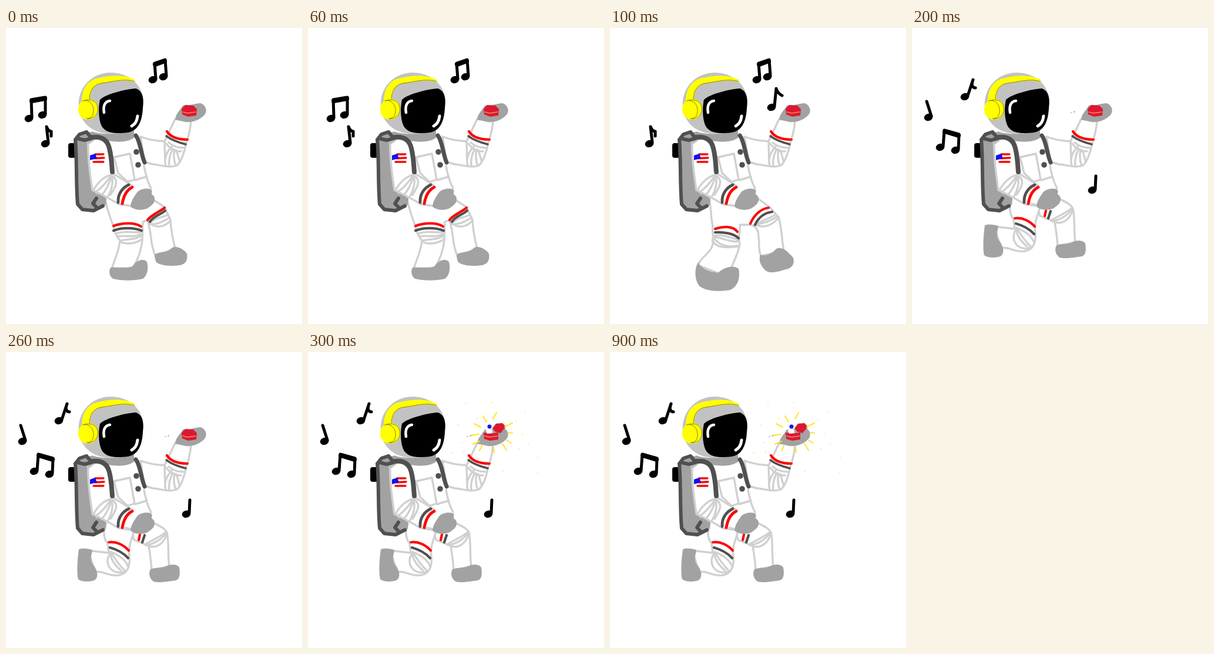
An HTML page for the animation above (1300 ms loop, 504x504 px).

```html
<!DOCTYPE html>
<html lang="en">
<head>
<meta charset="utf-8">
<title>Dancing astronaut</title>
<style>
  html, body { margin: 0; width: 100%; height: 100%; overflow: hidden; background: #fff; }
  svg { display: block; width: 100vw; height: 100vh; }
  path, line { fill: none; stroke-linecap: round; stroke-linejoin: round; }
  .suit { fill: #fff; stroke: #d0d0d0; stroke-width: 3.4; }
  .fold { stroke: #d0d0d0; stroke-width: 3.4; }
  .red { stroke: #fb0505; stroke-width: 4.2; }
  .dark { stroke: #505050; stroke-width: 4.2; }
  .strap { stroke: #505050; stroke-width: 6; }
  .grey { fill: #a2a2a2; }
  .ink { stroke: #000; stroke-width: 5; }
  .ray { stroke: #ffe51e; stroke-width: 2; }
  .trim { stroke: #8a8200; stroke-width: 1; }
</style>
</head>
<body>
<svg viewBox="0 0 504 504">
  <!-- legs -->
  <g data-show="0">
    <path class="suit" d="M168 288C171 306 178 324 183 338C185 347 187 353 194 362C193 378 185 394 180 410L217 408C223 395 230 382 232 362L233 330L241 327C244 338 246 348 247 358C248 370 251 380 255 390L288 375C284 360 281 344 280 327L270 305L250 292Z"/>
    <path class="fold" d="M188 350C201 344 217 350 230 347M190 355C204 352 215 358 229 351M194 362C208 359 219 361 230 354M194 364C208 370 222 366 231 360M244 333C257 321 266 323 276 318M246 334C259 335 269 328 279 323M246 333C257 342 271 338 280 328"/>
    <path class="red" d="M183 337C197 332 218 330 230 338M241 327C247 318 259 315 270 306"/>
    <path class="dark" d="M183 345C198 339 218 340 231 345M245 330C251 320 262 319 271 311"/>
    <path class="grey" d="M178 408C190 406 206 411 215 406C220 398 232 390 240 398C243 410 241 421 233 427C215 431 195 430 182 427C175 421 175 413 178 408ZM254 385C263 380 275 383 283 374C291 370 303 377 308 384C310 395 306 402 296 404C281 406 265 405 256 399Q252 391 254 385Z"/>
  </g>
  <g data-show="1">
    <path class="suit" d="M168 288C173 306 171 322 175 337C173 350 179 360 173 374C166 387 153 392 150 404L186 418L207 407C212 394 219 383 221 367C217 355 223 347 221 335L240 335C250 338 253 346 253 356C255 370 252 378 257 388L296 380C292 360 293 340 287 322L272 305L250 289Z"/>
    <path class="fold" d="M177 354C188 350 206 357 219 361M178 356C193 357 207 366 219 363M177 358C188 372 202 373 217 371M174 361C180 376 200 374 219 372M248 335C259 326 272 326 282 317M248 335C262 332 277 328 285 320M248 335C264 343 279 333 287 323"/>
    <path class="red" d="M179 342C190 338 209 336 217 347M239 333C245 319 256 308 270 306"/>
    <path class="dark" d="M179 348C194 347 211 350 219 358M247 335C253 322 262 315 276 313"/>
    <path class="grey" d="M150 399C155 410 170 415 184 417C194 407 211 403 219 410C222 425 218 440 205 446C187 449 165 449 153 440C143 429 144 408 150 399ZM256 386C265 390 276 384 283 376C293 370 304 382 312 391C315 401 310 410 299 411C286 415 271 420 263 411C255 403 253 393 256 386Z"/>
  </g>
  <g data-show="2 3">
    <path class="suit" d="M240 284C253 294 269 297 274 307C278 326 275 344 278 365L248 371C247 355 245 343 243 330L218 320L214 304Z"/>
    <path class="suit" d="M172 284C166 301 164 315 173 326L175 342L140 338L152 375C163 371 177 383 192 380C206 378 212 365 210 348C207 331 215 319 218 304Z"/>
    <path class="fold" d="M177 344C171 352 172 362 178 369C183 375 193 377 204 374M177 342C179 354 187 365 196 372M178 340C185 352 193 363 202 372M180 341C194 347 204 355 208 365M238 329C252 327 266 319 273 307M238 327C249 320 263 315 273 306M241 329C252 336 267 329 273 312"/>
    <path class="red" d="M175 324C188 322 201 329 209 338M228 311L226 320"/>
    <path class="dark" d="M177 333C188 336 200 342 208 351M236 312L232 324"/>
    <path class="grey" d="M124 336C131 333 140 335 147 337C146 346 142 353 148 362C157 372 158 385 150 389C140 392 128 391 123 387C120 375 122 350 124 336ZM246 370C257 366 267 369 274 364C281 361 292 361 295 367C297 378 296 388 288 389C274 391 256 394 250 390C243 384 243 375 246 370Z"/>
  </g>

  <!-- backpack -->
  <rect x="106" y="196" width="13" height="25" rx="4"/>
  <path class="grey" d="M117 189L126 180L145 177L180 201L170 301L155 311L130 310L121 301Z"/>
  <path fill="#c0c0c0" style="fill:#c0c0c0" d="M137 194L150 189L165 205L155 285L146 273Z"/>
  <path class="strap" d="M118 190C121 225 119 270 122 300L130 309L149 311L165 303M118 190L125 181L137 177L146 188L134 191L121 188M154 290L148 299L155 306"/>

  <!-- torso and arms -->
  <path style="fill:#fff" d="M140 199L155 188L219 186L231 195L239 240L250 278L225 302L172 291L146 273Z"/>
  <path class="fold" d="M235 235C238 249 240 260 247 273"/>
  <path class="suit" d="M229 185C241 190 255 192 270 193L288 155L315 158C314 173 311 184 307 195C304 212 298 228 291 234C278 239 263 233 250 232L236 228Z"/>
  <path class="fold" d="M270 193L271 231M273 197C280 206 287 211 298 210M277 195C286 203 294 204 302 204M282 202C272 213 269 224 272 234M284 206C278 217 277 227 278 235M287 207C285 218 286 227 289 234M290 208L296 228"/>
  <path class="red" d="M274 176C281 187 295 190 309 190"/>
  <path class="dark" style="stroke-width:3.5" d="M273 184C281 190 294 195 306 198"/>
  <path class="fold" d="M140 199C139 226 144 253 147 276C160 282 176 290 192 300L214 303M181 247C193 255 203 260 214 268M179 250C167 253 156 263 149 276M179 251C171 263 162 273 153 279M180 252C176 264 171 276 164 283M180 252C183 263 180 276 174 286M182 252C191 260 189 267 178 284"/>
  <path class="fold" d="M184 220L211 214L219 258L207 262L191 247ZM220 259L240 253"/>
  <circle cx="222" cy="211" r="4.8" fill="#505050"/>
  <circle cx="225" cy="233" r="4.8" fill="#505050"/>
  <path class="dark" style="stroke-width:4.8" d="M209 267C198 272 190 283 191 297"/>
  <path class="red" style="stroke-width:4.8" d="M215 271C205 276 200 287 198 299"/>
  <path class="grey" d="M223 280C228 274 240 272 247 275C251 278 246 281 249 284C256 288 254 299 245 304C237 312 219 311 212 304C213 294 217 289 223 280Z"/>
  <path class="grey" d="M288 156C289 145 297 140 301 132C313 133 323 128 331 128C341 131 344 143 337 149C328 158 316 161 306 160Z"/>

  <!-- shoulder patch -->
  <path class="red" style="stroke-width:3.3" d="M152 215L166 215M151 222L167 221M149 228L166 228"/>
  <path d="M143 217L152 214L155 222L143 225Z" style="fill:#1010ee"/>

  <!-- collar, straps, helmet -->
  <path class="grey" d="M146 176C165 183 195 181 218 173L218 187C203 197 183 193 172 192C161 190 153 187 146 181Z"/>
  <path class="strap" style="stroke-width:8" d="M147 186C164 184 173 191 176 205C180 221 180 234 181 245"/>
  <path class="strap" style="stroke-width:7" d="M221 183C229 193 229 212 236 229"/>
  <path style="fill:#c2c2c2" d="M124 135C121 103 145 76 178 76C211 76 235 99 234 128C233 156 215 180 178 180C145 180 126 159 124 135Z"/>
  <path style="fill:#000" d="M160 122C171 112 204 104 221 103C233 107 235 120 233 136C232 157 226 175 207 178C189 180 173 180 165 170C157 160 157 135 160 122Z"/>
  <path d="M167 144C165 133 168 125 177 124" stroke="#fff" stroke-width="4.5"/>
  <path d="M224 150C223 159 220 164 214 167" stroke="#fff" stroke-width="5"/>

  <!-- headphones -->
  <path style="fill:#ffff00" d="M129 126C129 101 141 88 158 85C180 80 201 79 219 88L219 92C199 86 181 93 163 94C147 97 143 109 143 126Z"/>
  <path class="trim" d="M142 123C142 106 149 96 163 94C181 92 200 85 219 91"/>
  <path style="fill:#ffff00" d="M131 123C140 119 152 121 156 131C159 145 152 156 141 156C129 157 122 147 123 136Q124 128 131 123Z"/>
  <path class="trim" d="M131 124C143 121 150 132 149 143C148 151 143 155 137 154M131 124C142 120 154 123 156 134C158 147 151 154 139 155"/>

  <!-- box -->
  <g data-show="0 1 2">
    <path style="fill:#dc1830" d="M299 138L305 131L319 132L325 138L324 149L310 151L300 147Z"/>
    <path d="M301 143L309 145L323 143" stroke="#f08a62" stroke-width="1.6"/>
  </g>
  <g data-show="3">
    <path style="fill:#dc1830" d="M299 137L310 139L324 137L324 149L310 151L300 148Z"/>
    <path style="fill:#fff" d="M303 134L305 129L314 133L314 138L305 139Z"/>
    <path d="M301 143L309 145L323 143" stroke="#f08a62" stroke-width="1.6"/>
    <path style="fill:#dc1830" d="M314 130L320 122L331 121L337 127L328 138L319 136Z"/>
    <circle cx="309" cy="127" r="3.5" fill="#1818ee"/>
    <g id="rays"></g>
  </g>
  <path data-show="2 3" d="M271 144h.3M276 143l1-.5" stroke="#222" stroke-width="1"/>
  <g id="notes"></g>
</svg>
<script>
  const STEPS = [0, 100, 200, 300], LOOP = 1300;
  const NS = 'http://www.w3.org/2000/svg';
  const get = id => document.getElementById(id);

  function add(parent, tag, attrs) {
    const el = document.createElementNS(NS, tag);
    for (const k in attrs) el.setAttribute(k, attrs[k]);
    return parent.appendChild(el);
  }

  function head(g, x, y) {
    add(g, 'ellipse', { cx: x, cy: y, rx: 7.5, ry: 6, transform: `rotate(-18 ${x} ${y})` });
  }

  // Stem from the head to its top, with an optional tail path.
  function note(show, x, y, topX, topY, tail = '') {
    const g = add(get('notes'), 'g', { 'data-show': show });
    head(g, x, y);
    add(g, 'path', { class: 'ink', d: `M${x + 5} ${y - 2}L${topX} ${topY}${tail}` });
  }

  function pair(show, x1, y1, x2, y2, a, b, c, d) {
    const g = add(get('notes'), 'g', { 'data-show': show });
    head(g, x1, y1);
    head(g, x2, y2);
    add(g, 'path', { class: 'ink', d: `M${x1 + 5} ${y1 - 2}L${a} ${b}L${c} ${d}L${x2 + 5} ${y2 - 2}` });
    add(g, 'path', { class: 'ink', style: 'stroke-width:8', d: `M${a + 1} ${b + 2}L${c - 1} ${d + 2}` });
  }

  pair('0', 39, 154, 62, 148, 43, 122, 67, 118);
  pair('0 1', 250, 88, 268, 83, 253, 60, 271, 54);
  note('0 1', 67, 197, 69, 168, 'Q72 176 77 176L77 184');
  note('1', 275, 135, 283, 103, 'Q286 112 293 115');
  pair('2 3', 48, 203, 74, 208, 55, 174, 80, 181);
  note('2 3', 90, 117, 104, 88, 'Q99 101 108 102');
  note('2 3', 28, 152, 25, 125);
  note('2 3', 307, 276, 313, 252);

  const rays = [
    [298, 109, 304, 119], [315, 114, 321, 103], [283, 122, 294, 128],
    [278, 142, 291, 140], [281, 157, 292, 152], [296, 160, 292, 168],
    [316, 163, 317, 171], [331, 156, 338, 167], [335, 127, 348, 121],
    [341, 137, 348, 138], [338, 150, 346, 155]
  ];
  const sparks = [
    [269, 87], [313, 86], [370, 101], [256, 124], [288, 113], [365, 140],
    [375, 156], [245, 172], [265, 170], [332, 203], [392, 180], [391, 205],
    [354, 117], [262, 154], [359, 165]
  ];
  for (const [x1, y1, x2, y2] of rays) add(get('rays'), 'line', { class: 'ray', x1, y1, x2, y2 });
  for (const [cx, cy] of sparks) add(get('rays'), 'circle', { cx, cy, r: 1, fill: '#ffe968' });

  const parts = [...document.querySelectorAll('[data-show]')]
    .map(el => ({ el, poses: el.dataset.show.split(' ').map(Number) }));
  const start = performance.now();
  let last = -1;

  function draw(now) {
    const t = Math.max(0, now - start) % LOOP;
    const pose = STEPS.filter(s => s <= t).length - 1;
    if (pose !== last) {
      for (const { el, poses } of parts) el.style.display = poses.includes(pose) ? '' : 'none';
      last = pose;
    }
    requestAnimationFrame(draw);
  }
  draw(start);
</script>
</body>
</html>
```
